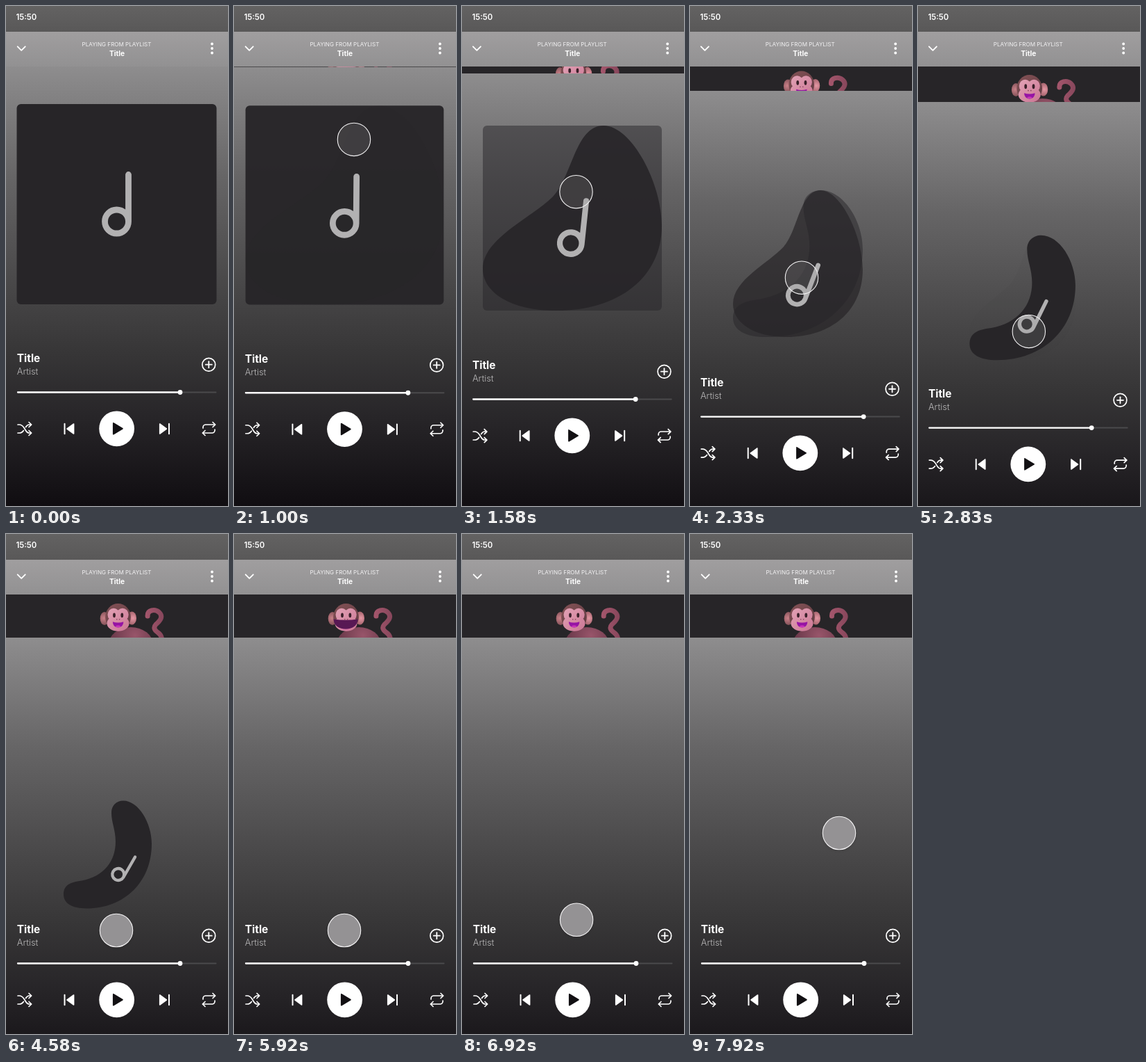
Recreate the animation shown at these times as an HTML page with a canvas. Size 320 by 719 pixels, loop 8000 ms.

```html
<!DOCTYPE html>
<html lang="en">
<head>
<meta charset="utf-8">
<title>Music player</title>
<style>
  html, body { margin: 0; width: 100%; height: 100%; overflow: hidden; background: #111; }
  canvas { display: block; width: 320px; height: 719px; }
</style>
</head>
<body>
<canvas id="stage"></canvas>
<script>
const W = 320, H = 719, LOOP = 8000, HEADER = 87, TAU = Math.PI * 2;
const FONT = 'Inter, "Liberation Sans", sans-serif';
const DARK = '#272528';
const canvas = document.getElementById('stage');
const ctx = canvas.getContext('2d');
const dpr = window.devicePixelRatio || 1;
canvas.width = W * dpr;
canvas.height = H * dpr;

const clamp = v => Math.min(1, Math.max(0, v));
const mix = (a, b, k) => a + (b - a) * k;
const easeInOut = k => k < 0.5 ? 4 * k ** 3 : 1 - 4 * (1 - k) ** 3;
const phase = (t, from, to) => clamp((t - from) / (to - from));

// Smooth curve through [time, value] keys without overshoot.
function track(...keys) {
  const rate = i => (keys[i + 1][1] - keys[i][1]) / (keys[i + 1][0] - keys[i][0]);
  const slopes = keys.map((_, i) => {
    if (i === 0 || i === keys.length - 1) return 0;
    const a = rate(i - 1), b = rate(i);
    return a * b > 0 ? 2 * a * b / (a + b) : 0;
  });
  return t => {
    const last = keys.length - 1;
    if (t <= keys[0][0]) return keys[0][1];
    if (t >= keys[last][0]) return keys[last][1];
    const i = keys.findIndex(k => k[0] > t) - 1;
    const [t0, v0] = keys[i], [t1, v1] = keys[i + 1];
    const d = t1 - t0, u = (t - t0) / d, w = 1 - u;
    return v0 * (1 + 2 * u) * w * w + v1 * u * u * (3 - 2 * u)
      + d * (slopes[i] * u * w * w - slopes[i + 1] * u * u * w);
  };
}

const pull = track([830, 0], [1580, 10], [2330, 35], [3250, 60], [3600, 62]);
const nudge = track([830, 0], [1580, -0.8], [4080, -0.8], [4400, 0]);
const cover = {
  x: track([830, 159.5], [1580, 159.8], [2330, 156.3], [3500, 146.5]),
  y: track([830, 285], [1580, 305], [2330, 370.5], [3500, 461]),
  w: track([830, 288], [1580, 258], [2330, 187], [3500, 127]),
  h: track([830, 288], [1580, 266], [2330, 211], [3500, 155]),
  square: track([830, 1], [1580, 0.5], [2100, 0]),
  blob: track([830, 0], [1580, 0.9], [2000, 0.95], [2330, 0.7], [2900, 0]),
  banana: track([1700, 0], [2330, 0.5], [2900, 1])
};
const note = {
  x: track([830, 159.5], [1580, 157.6], [2330, 155], [3500, 161.8]),
  y: track([830, 310], [1580, 341], [2330, 416], [3500, 489.5]),
  size: track([830, 1], [1580, 0.93], [2330, 0.76], [3500, 0.5]),
  turn: track([830, 0], [1580, 6], [2330, 21], [3500, 30])
};
const dragX = track([830, 174], [1580, 164.5], [2330, 161], [3500, 159]);
const dragY = track([830, 185], [1580, 267], [2330, 390.5], [3500, 546], [4080, 570]);
const solid = track([640, 1], [830, 0.13], [4080, 0.13], [4330, 1]);
const bite = track([5000, 0], [5450, 1], [5920, 1], [6400, 0]);

const BLOB = new Path2D('M.675 0C.83 0 1 .31 1 .54C1 .82 .76 1 .41 1C.155 1 0 .9 0 .775' +
  'C0 .61 .27 .5 .39 .385C.5 .28 .515 0 .675 0Z');
const BANANA = new Path2D('M.677 0C.85 0 1 .206 1 .4C1 .755 .69 1 .26 1C.1 1 0 .955 0 .87' +
  'C0 .787 .07 .755 .205 .742C.457 .703 .59 .56 .59 .38C.59 .27 .543 .206 .543 .11C.543 .045 .6 0 .677 0Z');
const SHUFFLE = new Path2D('M17 602h2c3 0 5 1.5 7 4.5l2.500 4c1.500 2.500 3 3.500 5 3.500h3' +
  'M17 614h2c3 0 5-1.500 6.300-3.500M28.500 605.500c1.500-2.500 3-3.500 5-3.500h3' +
  'M33 598.500l3.700 3.500l-3.700 3.500M33 610.500l3.700 3.500l-3.700 3.500');
const REPEAT = new Path2D('M284 607v-1a4 4 0 0 1 4-4h13.500M298 598.500l3.700 3.500l-3.700 3.500' +
  'M301 609v1a4 4 0 0 1-4 4h-13.500M287 610.500l-3.700 3.500l3.700 3.500');
const TAIL = new Path2D('M204.500 118C204 109 215 107.500 221 112.500C228 119 222 125 216.500 130' +
  'C211 136 217 140 221 143C224 145.500 225 148 225.500 154');

function fade(x0, y0, x1, y1, ...stops) {
  const g = ctx.createLinearGradient(x0, y0, x1, y1);
  stops.forEach(([at, color]) => g.addColorStop(at, color));
  return g;
}
function glow(x, y, r, inner, outer) {
  const g = ctx.createRadialGradient(x, y, 0, x, y, r);
  g.addColorStop(0, inner);
  g.addColorStop(1, outer);
  return g;
}
function oval(x, y, rx, ry, fill) {
  ctx.beginPath();
  ctx.ellipse(x, y, rx, ry, 0, 0, TAU);
  ctx.fillStyle = fill;
  ctx.fill();
}
function line(width, color, ...pts) {
  ctx.beginPath();
  pts.forEach(([x, y]) => ctx.lineTo(x, y));
  ctx.lineWidth = width;
  ctx.strokeStyle = color;
  ctx.stroke();
}
function triangle(color, ...pts) {
  line(1.6, color, ...pts, pts[0]);
  ctx.fillStyle = color;
  ctx.fill();
}
function text(str, x, y, size, weight, color = '#fff', align = 'left') {
  ctx.font = `${weight} ${size}px ${FONT}`;
  ctx.textAlign = align;
  ctx.fillStyle = color;
  ctx.fillText(str, x, y);
}

function drawTop(shift) {
  ctx.fillStyle = fade(0, 0, 0, 37, [0, '#636262'], [1, '#595858']);
  ctx.fillRect(0, 0, W, 37);
  ctx.fillStyle = fade(0, 37, 0, HEADER, [0, '#a09e9f'], [1, '#929192']);
  ctx.fillRect(0, 37, W, HEADER - 37);
  text('15:50', 14.5, 20.3, 11.3, 600);
  ctx.save();
  ctx.translate(shift, 0);
  text('PLAYING FROM PLAYLIST', 159.5, 58.4, 8.1, 400, '#f2f1f2', 'center');
  text('Title', 160, 72.2, 10.2, 700, '#fff', 'center');
  line(1.9, '#fff', [16.7, 58.3], [22.2, 63.8], [27.7, 58.3]);
  [54.5, 61, 67.5].forEach(y => oval(297, y, 1.9, 1.9, '#fff'));
  ctx.restore();
}

function drawMouth(open) {
  const half = mix(7.7, 17.5, open), top = mix(126.3, 122.5, open), low = mix(136.3, 140.5, open);
  const r = mix(150, 88, open), g = mix(20, 24, open), b = mix(164, 84, open);
  const x = mix(161.6, 161, open);
  ctx.beginPath();
  ctx.moveTo(x - half, top);
  ctx.quadraticCurveTo(x, top + 2.5, x + half, top);
  ctx.bezierCurveTo(x + half, low + 1, x - half, low + 1, x - half, top);
  ctx.closePath();
  ctx.fillStyle = `rgb(${r}, ${g}, ${b})`;
  ctx.fill();
  oval(x, low - 3.5, half * 0.45, 1.6, `rgba(212, 60, 190, ${mix(0.8, 0.15, open)})`);
}

function drawMonkey(t, offset, shift) {
  ctx.fillStyle = DARK;
  ctx.fillRect(0, HEADER, W, offset);
  ctx.save();
  ctx.beginPath();
  ctx.rect(0, HEADER, W, offset);
  ctx.clip();
  ctx.translate(shift, -34 * (1 - offset / 62) ** 2);

  ctx.save();
  ctx.translate(Math.sin(t / 420) * 0.4, 0);
  ctx.lineWidth = 7;
  ctx.strokeStyle = fade(202, 0, 230, 0, [0, '#a4566c'], [1, '#84455a']);
  ctx.stroke(TAIL);
  ctx.restore();

  oval(180, 159, 32, 25, glow(186, 146, 34, '#98556a', '#6c3a4b'));
  oval(142, 121.5, 6.3, 9.5, glow(141, 121, 10, '#c98088', '#855259'));
  oval(181.500, 121, 6.500, 9.5, glow(183, 121, 10, '#e597a4', '#a2616a'));
  oval(161.5, 119.5, 18.3, 19.5, fade(150, 100, 176, 136, [0, '#815054'], [1, '#603b42']));
  const face = fade(148, 108, 176, 138, [0, '#e1a0b4'], [1, '#cc7895']);
  oval(155.2, 116, 8.7, 9.2, face);
  oval(168, 116, 8.7, 9.2, face);
  oval(161.5, 128.500, 16, 11.3, face);
  oval(156, 116.8, 1.9, 3.4, '#392029');
  oval(167.3, 116.8, 1.9, 3.4, '#392029');
  oval(159.7, 122.7, 0.8, 0.8, '#7d3e55');
  oval(163.6, 122.7, 0.8, 0.8, '#7d3e55');
  drawMouth(bite(t));
  ctx.restore();
}

function drawSheet(offset, shift) {
  ctx.fillStyle = fade(0, HEADER + offset, 0, H + offset, [0, '#8e8d8e'], [0.085, '#807f80'],
    [0.25, '#666566'], [0.45, '#4e4d4e'], [0.65, '#373637'], [0.8, '#272528'], [1, '#100d11']);
  ctx.fillRect(0, HEADER + offset, W, H);

  ctx.save();
  ctx.translate(shift, offset);
  text('Title', 15.8, 512.3, 15.4, 700);
  text('Artist', 15.8, 530, 12.8, 300, '#bab9ba');

  ctx.beginPath();
  ctx.arc(292.3, 515.7, 9.4, 0, TAU);
  ctx.lineWidth = 1.7;
  ctx.strokeStyle = '#fff';
  ctx.stroke();
  line(1.8, '#fff', [287.8, 515.7], [296.8, 515.7]);
  line(1.8, '#fff', [292.3, 511.2], [292.3, 520.2]);

  line(2, '#4b4a4c', [17, 555.5], [302.5, 555.5]);
  line(2.3, '#fff', [17, 555.5], [251, 555.5]);
  oval(251, 555.5, 3.4, 3.4, '#fff');

  ctx.lineWidth = 1.7;
  ctx.stroke(SHUFFLE);
  ctx.stroke(REPEAT);
  line(2, '#fff', [84.5, 600.8], [84.5, 615.2]);
  triangle('#fff', [97.6, 601], [97.6, 615], [88, 608]);
  line(2, '#fff', [235, 600.8], [235, 615.2]);
  triangle('#fff', [221.700, 601], [221.700, 615], [231.3, 608]);
  oval(159.6, 607.8, 25.4, 25.4, '#fff');
  triangle('#121013', [154.7, 599.8], [154.7, 615.8], [168, 607.8]);
  ctx.restore();
}

function fillUnit(path, x, y, w, h, alpha) {
  if (alpha <= 0) return;
  ctx.save();
  ctx.globalAlpha = alpha;
  ctx.translate(x - w / 2, y - h / 2);
  ctx.scale(w, h);
  ctx.fill(path);
  ctx.restore();
}

function drawCover(t, shift) {
  const fly = phase(t, 4900, 5700);
  if (fly >= 1) return;
  const k = easeInOut(fly);
  const x = cover.x(t), y = cover.y(t), w = cover.w(t), h = cover.h(t);
  ctx.save();
  ctx.translate(mix(x, 161, k) + shift, mix(y, 131, k));
  ctx.scale(1 - 0.92 * k, 1 - 0.92 * k);
  ctx.translate(-x, -y);
  ctx.fillStyle = DARK;
  const alpha = cover.square(t);
  if (alpha > 0) {
    ctx.globalAlpha = alpha;
    ctx.beginPath();
    ctx.roundRect(x - w / 2, y - h / 2, w, h, 6);
    ctx.fill();
    ctx.globalAlpha = 1;
  }
  fillUnit(BLOB, x, y, w, h, cover.blob(t));
  fillUnit(BANANA, x, y, w, h, cover.banana(t));

  ctx.translate(note.x(t), note.y(t));
  ctx.rotate(note.turn(t) * Math.PI / 180);
  ctx.scale(note.size(t), note.size(t));
  ctx.beginPath();
  ctx.arc(0, 0, 17, 0, TAU);
  ctx.moveTo(17, 0);
  ctx.lineTo(17, -67.5);
  ctx.lineWidth = 8.8;
  ctx.strokeStyle = '#b2b1b2';
  ctx.stroke();
  ctx.restore();
}

function cursorAt(t) {
  if (t < 830) {
    const k = 1 - (1 - phase(t, 250, 580)) ** 2;
    return [mix(348, 174, k), mix(218, 185, k)];
  }
  const k = easeInOut(phase(t, 6500, 7900));
  return [mix(dragX(t), 215, k), mix(dragY(t), 430, k)];
}

function drawCursor(t) {
  if (t < 250) return;
  const [x, y] = cursorAt(t), s = solid(t);
  if (s > 0.2) oval(x, y + 2, 28, 28, glow(x, y + 2, 28, `rgba(0,0,0,${0.4 * s})`, 'rgba(0,0,0,0)'));
  ctx.beginPath();
  ctx.arc(x, y, 23.7, 0, TAU);
  ctx.fillStyle = `rgba(150, 148, 150, ${mix(0.2, 0.98, (s - 0.13) / 0.87)})`;
  ctx.fill();
  ctx.lineWidth = 1.1;
  ctx.strokeStyle = '#f4f3f4';
  ctx.stroke();
}

function render(t) {
  const offset = pull(t), shift = nudge(t);
  ctx.setTransform(dpr, 0, 0, dpr, 0, 0);
  ctx.lineCap = ctx.lineJoin = 'round';
  drawTop(shift);
  if (offset > 0) drawMonkey(t, offset, shift);
  drawSheet(offset, shift);
  drawCover(t, shift);
  drawCursor(t);
}

const start = performance.now();
function tick() {
  render((performance.now() - start) % LOOP);
  requestAnimationFrame(tick);
}
tick();
</script>
</body>
</html>
```
